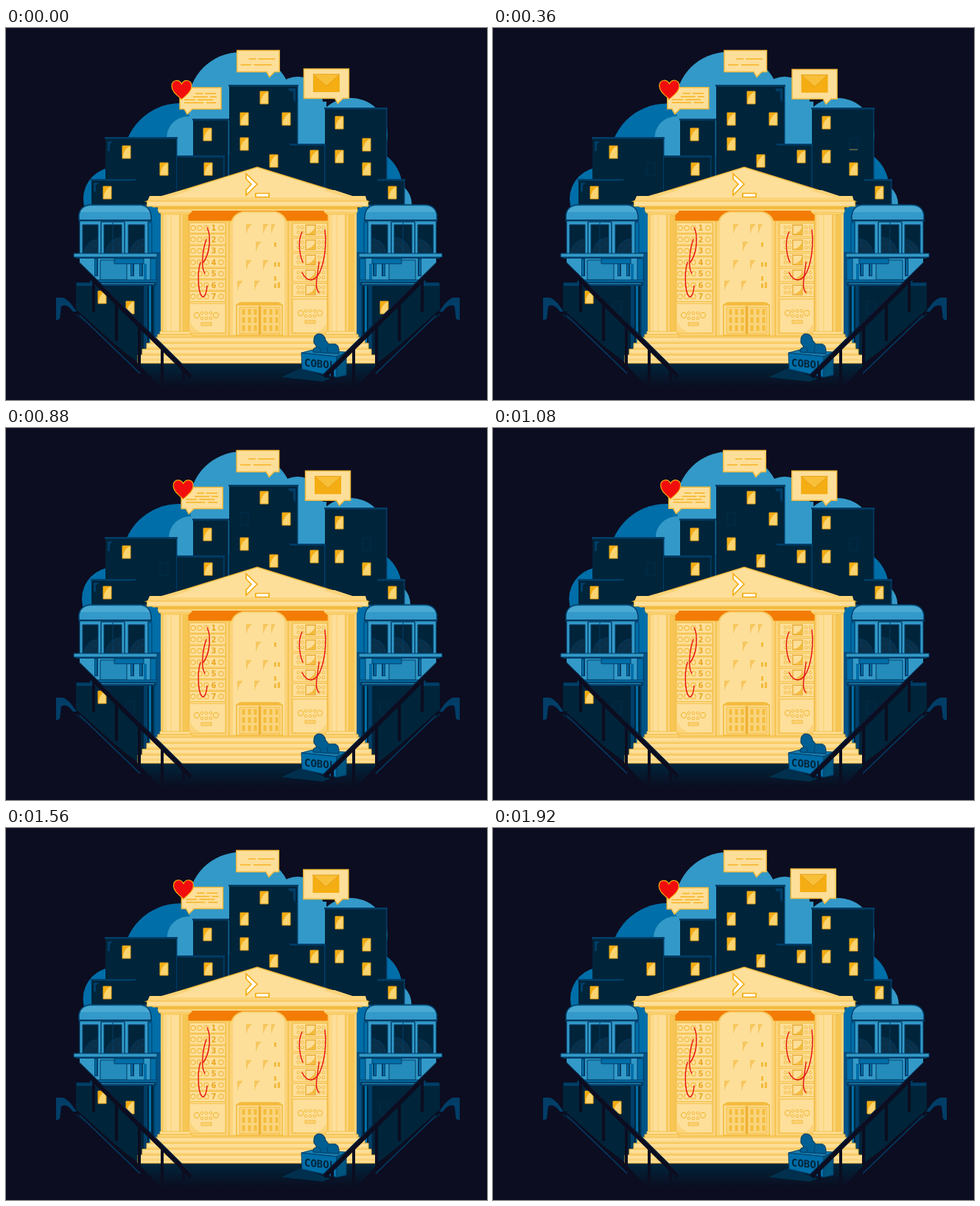
An HTML page with a canvas that plays this animation: 653 by 505 pixels, repeating every 1.96 s.

```html
<!DOCTYPE html>
<html lang="en">
<head>
<meta charset="utf-8">
<title>City hall</title>
<style>
html, body { margin: 0; width: 100%; height: 100%; overflow: hidden; background: #0c0d20; }
canvas { display: block; }
</style>
</head>
<body>
<canvas id="stage" width="653" height="505"></canvas>
<script>
const LOOP = 1960, STEP = 40;
const BG = '#0c0d20', NAVY = '#00243a', EDGE = '#003e68', MID = '#006ea8', SKY = '#3399c8';
const PALE = '#fddf9a', SAND = '#fbd37a', GOLD = '#f3bb3e', AMBER = '#f4ad12', ORANGE = '#f27c05', RED = '#f20d0d';
const c = document.getElementById('stage').getContext('2d');

function paint(fill, stroke, width = 1) {
  if (fill) { c.fillStyle = fill; c.fill(); }
  if (stroke) { c.strokeStyle = stroke; c.lineWidth = width; c.stroke(); }
}
function box(x, y, w, h, fill, stroke, width) {
  c.beginPath(); c.rect(x, y, w, h); paint(fill, stroke, width);
}
function round(x, y, w, h, r, fill, stroke, width) {
  c.beginPath(); c.roundRect(x, y, w, h, r); paint(fill, stroke, width);
}
function disc(x, y, r, fill, stroke, width) {
  c.beginPath(); c.arc(x, y, r, 0, 7); paint(fill, stroke, width);
}
function poly(pts, fill, stroke, width) {
  c.beginPath();
  for (let i = 0; i < pts.length; i += 2) c.lineTo(pts[i], pts[i + 1]);
  c.closePath(); paint(fill, stroke, width);
}
function line(x1, y1, x2, y2, color, width = 1) {
  c.beginPath(); c.moveTo(x1, y1); c.lineTo(x2, y2); paint(null, color, width);
}
function path(d, fill, stroke, width) {
  const p = new Path2D(d);
  if (fill) { c.fillStyle = fill; c.fill(p); }
  if (stroke) { c.strokeStyle = stroke; c.lineWidth = width || 1; c.stroke(p); }
}
function shifted(x, y, draw) {
  c.save(); c.translate(x, y); draw(); c.restore();
}
function bothSides(draw) {
  draw();
  c.save(); c.translate(684, 0); c.scale(-1, 1); draw(); c.restore();
}
const wave = (t, peak) => Math.cos(2 * Math.PI * (t - peak) / LOOP);

function clouds(t) {
  const d = (1 + wave(t, 870)) / 2;
  disc(237 - 2 * d, 180 + d, 78, MID);
  disc(148 - 2 * d, 232, 43, MID);
  disc(484 - d, 217, 54, MID);
  disc(518 - 2 * d, 240, 33, SKY);
  disc(247 + 3 * d, 149, 29, SKY);
  disc(318 + 2 * d, 104 - d, 71, SKY);
  disc(396, 100, 34, SKY);
  disc(468 - d, 145, 50, SKY);
  box(385, 100, 50, 70, SKY);
}

function tower(x, y, w, h) {
  box(x, y, w, h, NAVY);
  box(x - 1, y - 1, w + 2, 2.5, EDGE);
  box(x + w - 1, y, 1.5, h, EDGE);
}
function city() {
  tower(303, 78, 93, 150);
  tower(254, 124, 48, 90);
  tower(135, 149, 97, 100);
  tower(232, 174, 64, 60);
  tower(433, 109, 84, 140);
  tower(386, 158, 47, 80);
  tower(116, 206, 60, 45);
  tower(505, 206, 36, 45);
  box(170, 207, 60, 45, NAVY);
  path('M383 82H393V101L390 97V86H385Z', EDGE);
  path('M138 154H145L141 158V167H138Z', EDGE);
  path('M119 210H126L122 214V222H119Z', EDGE);
}

// x, y, then optional switch-off and switch-on times
const panes = [
  [158, 160], [209, 183, 200, 1240], [269, 183], [268, 136], [345, 86],
  [318, 115, 520, 1560], [375, 115], [318, 149], [358, 172], [413, 166],
  [447, 120], [484, 150, 340, 1240], [447, 166], [484, 183], [132, 215],
  [519, 215], [125, 357], [163, 371, 200, 1560], [508, 371, 200, 1820]
];
function pane([x, y, off, on], t) {
  if (t >= off && t < on) {
    box(x, y, 11, 17, NAVY, '#002e4b', 1);
    if (t < off + 80) line(x, y + 15, x + 11, y + 15, '#a98d4f');
    return;
  }
  box(x, y, 11, 17, '#fbd471', '#e5a41c', 1);
  path(`M${x} ${y + 17}V${y}H${x + 11}Q${x + 2} ${y + 3} ${x} ${y + 17}Z`, AMBER);
}

function under() {
  poly([95, 345, 212, 345, 212, 456, 182, 456, 95, 390], NAVY);
  box(190, 245, 23, 100, MID);
  box(202, 245, 10, 175, '#005486');
  box(96, 346, 108, 4, EDGE);
  box(187, 350, 5, 85, EDGE);
  box(194, 350, 3, 85, MID);
  box(200, 350, 2, 85, EDGE);
}
function glass(x, y, w, h) {
  box(x, y, w, h, NAVY, EDGE, 1);
  c.save();
  c.beginPath(); c.rect(x, y, w, h); c.clip();
  disc(x + w, y + h, w * .9, '#0a3049', EDGE, .8);
  disc(x + w, y + h, w * .55, null, EDGE, .8);
  c.restore();
}
function train() {
  path('M188 240H198Q211 244 211 262V305H188Z', MID, EDGE);
  path('M99 262V253Q102 240 116 240H183Q195 241 197 255V262Z', SKY, EDGE, 1.5);
  path('M101 250Q104 242 116 242H183Q192 243 195 250Z', '#4aa9d2');
  line(99, 261, 198, 261, EDGE, 2);
  box(100, 262, 93, 45, SKY, EDGE, 1);
  glass(104, 267, 21, 39);
  round(129, 263, 32, 44, 2, SKY, EDGE, 1.5);
  glass(133, 267, 24, 39);
  line(145, 264, 145, 306, EDGE);
  glass(166, 267, 22, 39);
  box(193, 264, 5, 42, MID, EDGE, 1);
  poly([100, 312, 196, 312, 204, 322, 204, 345, 118, 345, 100, 323], SKY);
  box(92, 306, 113, 5, SKY, EDGE, 1);
  box(95, 311, 107, 2, EDGE);
  box(128, 315, 36, 27, '#248bbb', EDGE, 1);
  for (const x of [120, 169, 181]) {
    box(x, 313, 5, 24, EDGE);
    box(x + 1, 314, 2, 22, MID);
  }
  box(147, 313, 40, 7, MID, EDGE, 1);
  box(187, 320, 4, 24, MID);
  box(196, 313, 8, 30, MID, EDGE, 1);
  box(115, 342, 90, 3, MID, EDGE, 1);
  line(118, 347, 201, 347, SKY);
}

function rails() {
  line(96, 319, 252, 473, BG, 7);
  line(99, 318, 254, 471, EDGE, .8);
  for (const [x, y, h] of [[119, 340, 45], [150, 370, 55], [181, 400, 58], [212, 434, 48], [241, 460, 18]])
    line(x, y, x, y + h, BG, 4);
  poly([86, 378, 96, 383, 190, 467, 180, 470], BG);
  path('M68 397V366H77Q84 368 91 378L96 385L91 385Q82 373 75 378L73 395Z', EDGE);
  line(100, 390, 182, 469, EDGE, 1.6);
}

function column(x, w) {
  box(x, 250, w, 168, SAND, GOLD, 1);
  box(x + 3, 251, w - 14, 166, PALE);
  for (const k of [5, 12, 24, 29]) line(x + k, 252, x + k, 416, k > 20 ? GOLD : SAND, 1.4);
  box(x + w - 6, 251, 6, 166, '#f7c553');
  round(x - 5, 244, w + 10, 7, 2, PALE, GOLD, 1);
  box(x - 2, 250, w + 4, 3, SAND, GOLD, .8);
  box(x - 3, 412, w + 6, 4, PALE, GOLD, .8);
  box(x - 6, 416, w + 12, 6, SAND, GOLD, 1);
}

function knobs(x, y) {
  disc(x - 13, y, 3.6, null, GOLD, 1.2);
  disc(x + 13, y, 3.6, null, GOLD, 1.2);
  for (let i = -1; i < 2; i++) {
    disc(x + i * 6, y - 3, 1.9, null, GOLD, 1);
    disc(x + i * 6, y + 4, 1.9, null, GOLD, 1);
  }
  box(x - 7, y + 10, 14, 4, SAND, GOLD, 1);
}
function cabinets() {
  box(247, 262, 56, 156, SAND, GOLD, 1);
  box(249, 265, 49, 149, PALE, GOLD, .8);
  c.font = 'bold 10px "DejaVu Sans", sans-serif';
  c.textAlign = 'center';
  for (let i = 0; i < 7; i++) {
    const y = 271.5 + i * 15.5;
    box(249, y - 7, 49, 14, PALE, GOLD, 1.1);
    for (const x of [254, 263, 272, 292]) disc(x, y, 3.2, null, GOLD, 1.2);
    c.fillStyle = '#e9a722';
    c.fillText(i + 1, 282, y + 3.7);
  }
  box(249, 374, 49, 40, PALE, GOLD, 1);
  path('M249 414V394Q252 411 270 414Z', SAND);
  knobs(272, 390);

  box(383, 262, 54, 156, SAND, GOLD, 1);
  box(388, 265, 48, 149, PALE, GOLD, .8);
  for (let i = 0; i < 5; i++) {
    const y = 274 + i * 20.4;
    box(389, y - 9, 47, 18, PALE, GOLD, 1);
    box(407, y - 6.5, 13, 13, PALE, '#e7a72c', 1.3);
    path(`M407 ${y + 6}H420V${y - 6}Q418 ${y + 4} 407 ${y + 6}Z`, GOLD);
    for (const x of [397, 402.5, 425, 431]) {
      disc(x, y - 3.4, 2, null, GOLD, 1);
      disc(x, y + 3.4, 2, null, GOLD, 1);
    }
  }
  box(389, 368, 47, 46, PALE, GOLD, 1);
  path('M436 414V396Q433 411 418 414Z', SAND);
  knobs(413, 387);
}

function doorway() {
  path('M303 418V262H306Q309 252 321 249H366Q378 252 381 262H383V418Z', SAND, GOLD);
  path('M308 416V264Q310 253 322 251H365Q376 253 378 264V416Z', PALE);
  for (const [x, y] of [[326, 266], [349, 266], [339, 290], [326, 315], [349, 315], [314, 343], [337, 343], [360, 266]]) {
    const w = x > 355 ? 6 : 8;
    path(`M${x} ${y + 14}V${y}H${x + w}Q${x + 3} ${y + 4} ${x} ${y + 14}Z`, '#f6c75e');
  }
  for (const y of [291, 318, 337, 347]) box(364, y, 3, 6, GOLD);
  box(369, 318, 3, 6, GOLD);
  box(369, 345, 3, 8, GOLD);
  path('M312 378Q314 372 320 372H368Q374 372 376 378Z', GOLD);
  box(313, 376, 62, 41, PALE, GOLD, 1.6);
  for (const x of [317, 346]) {
    box(x, 379, 26, 36, SAND, GOLD, 1);
    for (let i = 0; i < 3; i++) for (let j = 0; j < 3; j++)
      box(x + 3 + i * 8, 381 + j * 11, 5, 9, '#f4bd3d', PALE, .7);
  }
  line(344.5, 377, 344.5, 416, '#e8a622', 2);
}

function cables() {
  c.lineCap = 'round';
  for (const d of [
    'M273 271C278 280 278 304 268 318',
    'M272 287C266 303 265 327 270 333',
    'M264 318C259 334 261 366 268 365Q272 363 273 350',
    'M402 277C396 288 398 307 403 318',
    'M433 274C436 301 430 340 414 342Q407 342 402 332',
    'M425 318C423 335 418 354 425 359'
  ]) path(d, null, '#e70d12', 1.4);
  c.lineCap = 'butt';
}

function hall() {
  box(210, 243, 266, 178, SAND);
  box(247, 247, 190, 20, ORANGE);
  cabinets();
  doorway();
  bothSides(() => poly([247, 248, 303, 248, 303, 259, 247, 259], ORANGE));
  cables();
  column(212, 35);
  column(437, 35);
  const steps = [[196, 420, 291], [191, 428, 301], [185, 436, 311], [179, 444, 324]];
  for (const [x, y, w] of steps) {
    box(x, y, w, y > 440 ? 11 : 8, PALE, GOLD, 1);
    box(x, y + 5, w, 3, SAND);
  }
  box(206, 242, 271, 5, GOLD);
  box(199, 238, 284, 5, SAND, GOLD, 1);
  poly([341, 189, 490, 235, 192, 235], PALE, GOLD, 1.5);
  poly([195, 228, 211, 228, 240, 220, 446, 220, 470, 228, 488, 228, 490, 235, 192, 235], SAND);
  poly([341, 194, 463, 230, 219, 230], PALE);
  box(191.5, 235, 300, 7, PALE, GOLD, 1.2);
  box(206, 246, 271, 2, SAND);
  poly([326, 198, 341, 212, 326, 227, 326, 220, 333, 212, 326, 205], '#fff', AMBER, 1.7);
  box(339, 224.5, 18, 5, '#fff', AMBER, 1.7);
}

function ground() {
  const g = c.createLinearGradient(0, 456, 0, 488);
  g.addColorStop(0, NAVY);
  g.addColorStop(1, BG);
  poly([180, 456, 505, 456, 475, 488, 210, 488], g);
}
function statue() {
  poly([374, 474, 402, 461, 440, 476, 430, 480], '#00304d');
  poly([401, 441, 416, 437, 462, 440, 449, 446], '#187fb2', EDGE);
  poly([401, 441, 449, 446, 449, 474, 402, 463], MID, EDGE);
  poly([449, 446, 462, 440, 462, 471, 449, 474], '#00557f', EDGE);
  path('M417 440Q416 435 422 433L418 427Q417 417 424 415Q432 415 434 424L438 429H447Q453 432 452 442Z', '#005f92', EDGE, 1.2);
  path('M438 431Q434 436 438 441M424 433Q429 436 426 440', null, EDGE, 1);
  c.save();
  c.translate(405, 459);
  c.transform(1, .09, 0, 1, 0, 0);
  c.font = 'bold 14px "DejaVu Sans Mono", monospace';
  c.textAlign = 'left';
  c.fillStyle = NAVY;
  c.fillText('COBOL', 0, 0);
  c.restore();
}

function bubble(x, y, w, h, tail) {
  path(`M${x} ${y}H${x + w}V${y + h}H${x + tail + 11}L${x + tail + 4} ${y + h + 7}L${x + tail} ${y + h}H${x}Z`, PALE, GOLD, 1.5);
}
function dashes(y, ...xs) {
  for (let i = 0; i < xs.length; i += 2) line(xs[i], y, xs[i + 1], y, AMBER, 1.3);
}
function messages(t) {
  const slide = 3.4 * (t < 1400 ? t / 1400 : (LOOP - t) / 560);
  shifted(slide, -slide / 4, () => {
    bubble(236, 81, 56, 29, 6);
    dashes(89, 257, 267, 270, 285);
    dashes(93.5, 254, 274, 277, 286);
    dashes(97.5, 242, 257, 260, 281);
    dashes(101.5, 242, 268, 272, 285);
    path('M238.5 97C232 91 225 86 225 79C225 70 235 69 238.5 76C242 69 252 70 252 79C252 86 245 91 238.5 97Z', RED, AMBER, 1.2);
  });
  shifted(-.7 * (1 + wave(t, 1300)), 0, () => {
    bubble(314, 30.5, 57.5, 29, 40);
    dashes(42, 330, 340, 343, 366);
    dashes(50, 319, 333, 337, 361);
  });
  shifted(.8 + 1.5 * wave(t, 680), 1.3 + 1.4 * wave(t, 980), () => {
    bubble(404.5, 55.5, 61, 40, 42);
    box(417, 63, 36, 24, AMBER);
    poly([417, 63, 453, 63, 435, 79], '#f8bf39', '#e8a019', 1);
  });
}

function draw(t) {
  c.fillStyle = BG;
  c.fillRect(0, 0, 653, 505);
  clouds(t);
  city();
  bothSides(under);
  for (const p of panes) pane(p, t);
  bothSides(train);
  ground();
  hall();
  statue();
  bothSides(rails);
  messages(t);
}

const start = performance.now();
function tick() {
  const t = (performance.now() - start) % LOOP;
  draw(Math.floor(t / STEP) * STEP);
  requestAnimationFrame(tick);
}
tick();
</script>
</body>
</html>
```
